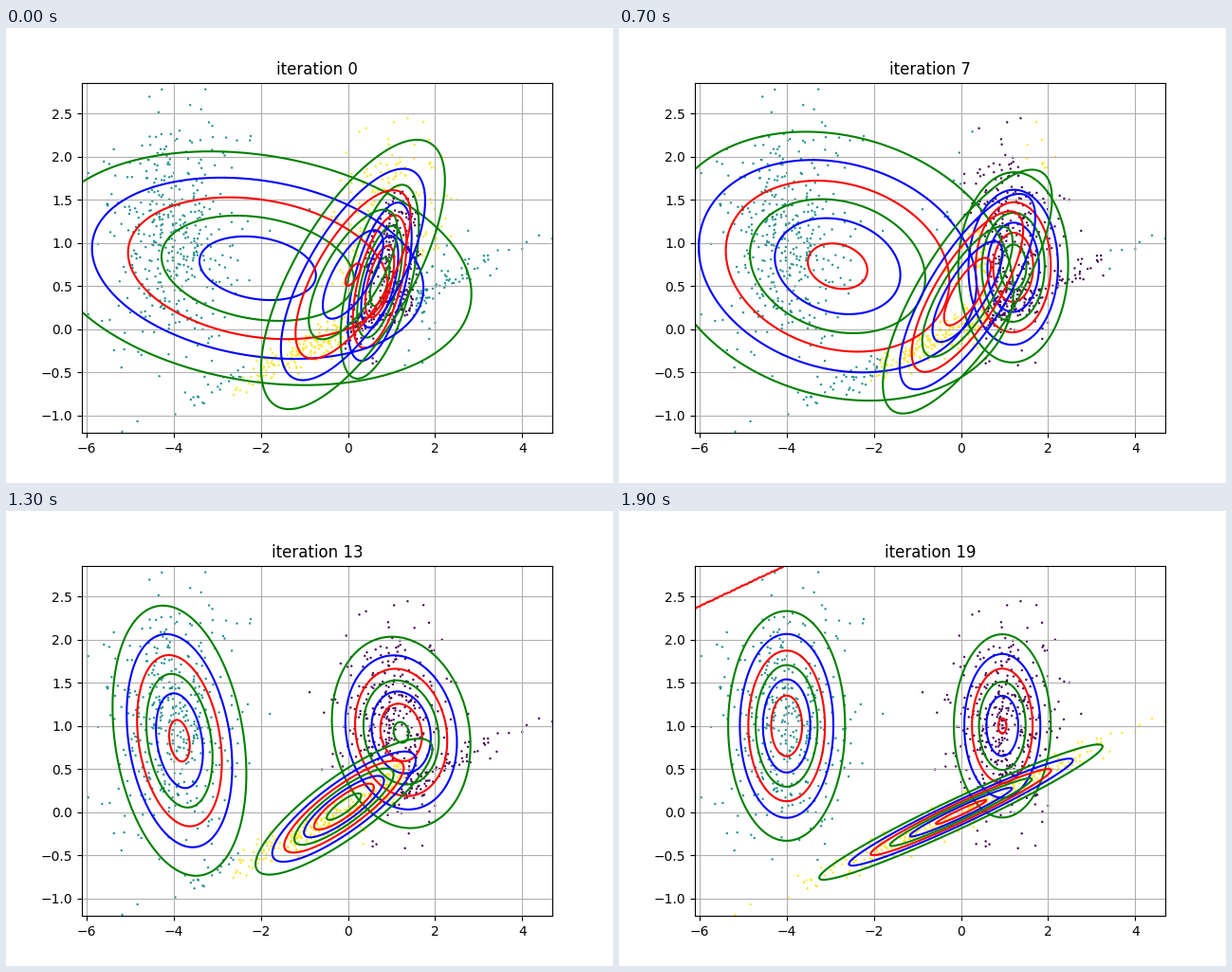
A matplotlib script for the animation above (2 s loop, 640 px wide and 480 px high).

```python
import numpy as np
import matplotlib.pyplot as plt
from matplotlib.animation import FuncAnimation

FRAMES, INTERVAL = 20, 100
XLIM, YLIM = (-6.105, 4.69), (-1.205, 2.86)

# Fitted Gaussians at a few iterations: mean x, mean y, std x, std y, correlation
KEYS = np.array([0, 3, 7, 9, 11, 15, 19])
RIGHT = np.array([
    [0.73, 0.55, 0.440, 0.552, 0.57],
    [1.02, 0.62, 0.562, 0.526, 0.27],
    [1.20, 0.717, 0.620, 0.543, 0.02],
    [1.24, 0.79, 0.729, 0.567, -0.03],
    [1.24, 0.86, 0.803, 0.580, -0.10],
    [1.18, 0.97, 0.795, 0.539, -0.145],
    [0.95, 1.00, 0.585, 0.5595, 0.0],
])
LEFT = np.array([
    [-2.07, 0.706, 2.63, 0.727, -0.22],
    [-2.37, 0.727, 2.40, 0.786, -0.178],
    [-2.83, 0.73, 2.10, 0.812, -0.18],
    [-3.20, 0.72, 1.72, 0.830, -0.245],
    [-3.67, 0.745, 1.026, 0.847, -0.39],
    [-3.965, 0.92, 0.70, 0.768, -0.075],
    [-4.00, 1.00, 0.683, 0.679, 0.0],
])
SLANTED = np.array([
    [0.117, 0.634, 1.11, 0.8225, 0.697],
    [0.24, 0.546, 1.10, 0.760, 0.728],
    [0.15, 0.435, 0.985, 0.718, 0.763],
    [0.10, 0.35, 0.919, 0.642, 0.757],
    [0.05, 0.21, 0.875, 0.504, 0.77],
    [-0.195, -0.02, 1.244, 0.333, 0.929],
    [0.0, 0.0, 1.69, 0.408, 0.9704],
])
PARTS = (RIGHT, LEFT, SLANTED)

OUTLIERS = [
    (-4.27, 2.78), (-3.62, 2.60), (-3.37, 2.55), (-2.23, 2.24),
    (-2.25, 2.19), (-5.96, 1.81), (-1.79, 1.14), (-5.96, 0.17),
    (4.69, 1.05), (4.10, 1.01), (4.00, 0.93), (2.76, 1.14),
    (1.06, 2.40), (2.16, 2.00), (-0.88, 1.39), (1.71, -0.39),
    (-4.83, -1.07), (-5.18, -1.19),
]


def monotone(t, xs, ys):
    """Shape-preserving cubic interpolation of the rows of ys."""
    h = np.diff(xs)[:, None]
    d = np.diff(ys, axis=0) / h
    a, b = d[:-1], d[1:]
    same = a * b > 0
    inner = np.where(same, 2 * a * b / np.where(same, a + b, 1), 0)
    m = np.vstack([d[:1], inner, d[-1:]])
    i = min(np.searchsorted(xs, t, side="right") - 1, len(xs) - 2)
    w = h[i]
    u = (t - xs[i]) / w
    return (ys[i] * (1 + 2 * u) * (1 - u) ** 2 + m[i] * w * u * (1 - u) ** 2
            + ys[i + 1] * u * u * (3 - 2 * u) + m[i + 1] * w * u * u * (u - 1))


def log_pdf(x, y, part):
    mx, my, sx, sy, rho = part
    u, v = (x - mx) / sx, (y - my) / sy
    k = 1 - rho * rho
    q = (u * u - 2 * rho * u * v + v * v) / k
    return -np.log(2 * np.pi * sx * sy * np.sqrt(k)), -q / 2


def sample(rng, part, n):
    mx, my, sx, sy, rho = part
    a, b = rng.standard_normal((2, n))
    keep = np.hypot(a, b) < 2.85
    a, b = a[keep], b[keep]
    return np.column_stack([mx + sx * a,
                            my + sy * (rho * a + np.sqrt(1 - rho * rho) * b)])


rng = np.random.default_rng(4)
points = np.vstack([sample(rng, p[-1], 400) for p in PARTS] + [OUTLIERS])
px, py = points.T
gx, gy = np.meshgrid(np.linspace(*XLIM, 300), np.linspace(*YLIM, 300))

fig, ax = plt.subplots(figsize=(6.4, 4.8), dpi=100)


def draw(i):
    ax.clear()
    parts = [monotone(i, KEYS, p) for p in PARTS]
    labels = np.argmax([sum(log_pdf(px, py, p)) for p in parts], axis=0)
    ax.scatter(px, py, c=labels, s=2, marker=".", cmap="viridis", vmin=0, vmax=2)
    for p in parts:
        scale, expo = log_pdf(gx, gy, p)
        ax.contour(gx, gy, np.exp(scale) * np.exp(expo), colors=("r", "g", "b"))
    ax.set_xlim(XLIM)
    ax.set_ylim(YLIM)
    ax.grid(True)
    ax.set_title(f"iteration {i}")
    return []


anim = FuncAnimation(fig, draw, frames=FRAMES, interval=INTERVAL,
                     init_func=lambda: draw(0), repeat=True, repeat_delay=0)
plt.show()
```
